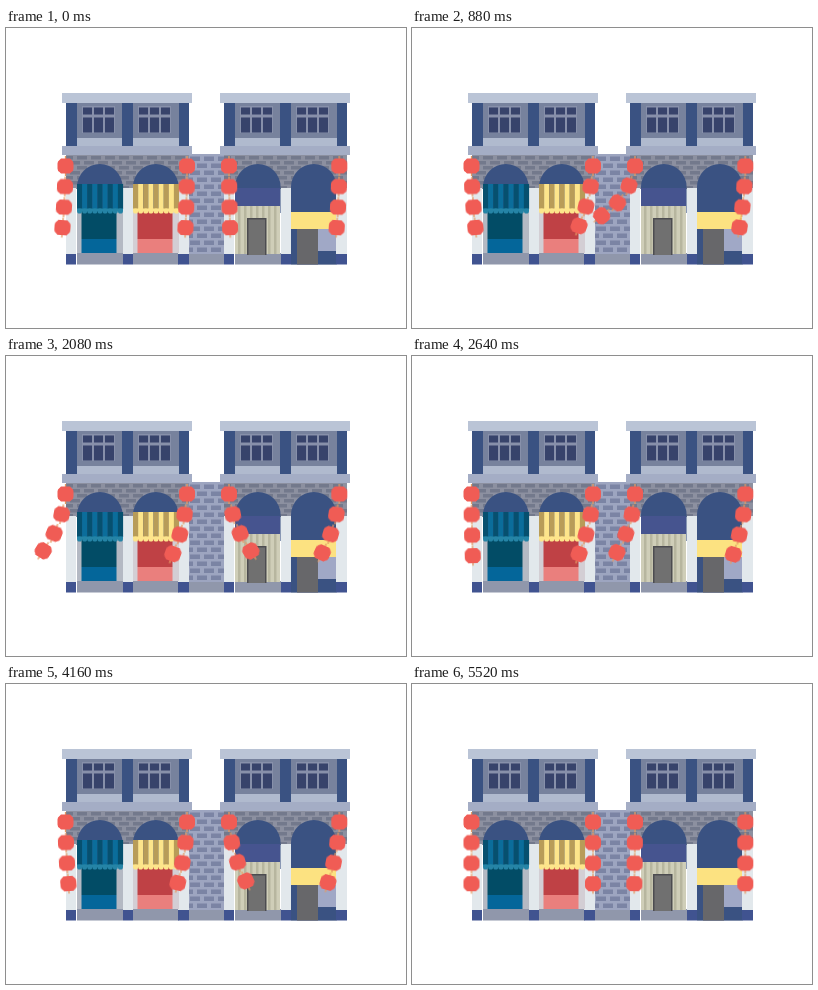
An HTML page for the animation above (5.6 s loop, 400 by 300 pixels).

```html
<!DOCTYPE html>
<html lang="en">
<head>
<meta charset="utf-8">
<title>Shophouses with swinging lanterns</title>
<style>
html, body { margin: 0; width: 100%; height: 100%; overflow: hidden; background: #fff; }
svg { display: block; width: 100vw; height: 100vh; }

/* Each link turns relative to the one above, so the string curls. */
.link { animation: 5600ms cubic-bezier(.37, 0, .63, 1) infinite; transform-origin: 0 0; }
.a .link { animation-name: swing-a; }
.b .link { animation-name: swing-b; }
.c .link { animation-name: swing-c; }
.d .link { animation-name: swing-d; }

@keyframes swing-a {
  0% { transform: rotate(1.4deg); }
  6.79% { transform: rotate(18.5deg); }
  22.86% { transform: rotate(-16deg); }
  36.43% { transform: rotate(10.8deg); }
  54.64% { transform: rotate(-7deg); }
  65.71% { transform: rotate(8.3deg); }
  78.57% { transform: rotate(-4.5deg); }
  88.39% { transform: rotate(1.5deg); }
  91.96%, 100% { transform: rotate(0deg); }
}
@keyframes swing-b {
  0% { transform: rotate(.7deg); }
  9.64% { transform: rotate(15deg); }
  25.71% { transform: rotate(-12deg); }
  41.79% { transform: rotate(11deg); }
  57.86% { transform: rotate(-7deg); }
  70.71% { transform: rotate(7deg); }
  80.71% { transform: rotate(-2.5deg); }
  86.61% { transform: rotate(1deg); }
  91.96%, 100% { transform: rotate(0deg); }
}
@keyframes swing-c {
  0% { transform: rotate(-.5deg); }
  13.57% { transform: rotate(18deg); }
  32.14% { transform: rotate(-14.5deg); }
  51.79% { transform: rotate(12deg); }
  75% { transform: rotate(-8deg); }
  90.18% { transform: rotate(9.5deg); }
  98.57%, 100% { transform: rotate(.3deg); }
}
@keyframes swing-d {
  0% { transform: rotate(1.2deg); }
  9.11% { transform: rotate(14deg); }
  23.93% { transform: rotate(-13.2deg); }
  41.07% { transform: rotate(11deg); }
  57.86% { transform: rotate(-7.6deg); }
  71.07% { transform: rotate(8deg); }
  80.71% { transform: rotate(-2.8deg); }
  86.61% { transform: rotate(1deg); }
  91.96%, 100% { transform: rotate(0deg); }
}
</style>
</head>
<body>
<svg id="stage" viewBox="0 0 400 300">
  <defs>
    <pattern id="brick" width="14" height="10" patternUnits="userSpaceOnUse" y="127">
      <rect width="14" height="10" fill="#8c90a0"/>
      <path d="M1 1h10v3.5h-10zM0 6h4v3.5h-4zM8 6h6v3.5h-6z" fill="#73798c"/>
    </pattern>
    <pattern id="alley" width="14" height="14" patternUnits="userSpaceOnUse" x="183" y="127">
      <rect width="14" height="14" fill="#9da5c0"/>
      <path d="M1 1.5h10v4.5h-10zM0 8.5h4v4.5h-4zM8 8.5h6v4.5h-6z" fill="#7b84a4"/>
    </pattern>
  </defs>
</svg>
<script>
const NS = 'http://www.w3.org/2000/svg';
const stage = document.getElementById('stage');
const BLUE = '#3a5282', BASE = '#405390', ROOF = '#bac4d6', WHITE = '#e2e8ec', STEP = '#9097ab';

function add(parent, tag, attrs) {
  const el = document.createElementNS(NS, tag);
  for (const key in attrs) el.setAttribute(key, attrs[key]);
  return parent.appendChild(el);
}
const box = (g, x, y, width, height, fill) => add(g, 'rect', { x, y, width, height, fill });

function house(dx) {
  const g = add(stage, 'g', { transform: `translate(${dx} 0)` });
  box(g, 60, 75, 123, 43, '#77829d');
  for (const x of [71, 127]) {
    box(g, x, 110, 46, 8, '#b0bace');
    box(g, x + 5, 78, 33, 27, '#8790aa');
    for (const px of [6, 17, 28]) {
      box(g, x + px, 79.5, 9, 7, '#37436b');
      box(g, x + px, 89.5, 9, 15, '#37436b');
    }
  }
  for (const [x, w] of [[60, 11], [116, 11], [173, 10]]) box(g, x, 75, w, 43, BLUE);
  box(g, 56, 65, 130, 10, ROOF);
  box(g, 60, 127, 123, 34, 'url(#brick)');
  box(g, 56, 118, 130, 9, '#a4adc5');
  for (const x of [71, 127]) {
    add(g, 'path', { d: `M${x} 185V159a22.8 23 0 0 1 45.6 0V185z`, fill: BLUE });
    box(g, x, 225, 46, 11.5, STEP);
  }
  for (const [x, w] of [[60, 10], [117, 10], [172, 11]]) {
    box(g, x, 160, w, 66, WHITE);
    box(g, x, 226, w, 10.5, BASE);
  }
}

function awning(x, colors, trim) {
  const w = 46 / 9;
  for (let i = 0; i < 9; i++) {
    const left = x + i * w;
    box(stage, left, 156, w + .1, 25, colors[i % 2]);
    add(stage, 'circle', { cx: left + w / 2, cy: 183, r: w / 2, fill: trim });
  }
  box(stage, x, 180.5, 46, 2.5, trim);
}

function shop(x, frame, dark, front) {
  box(stage, x, 180, 46, 45, frame);
  box(stage, x + 4.5, 180, 35, 31, dark);
  box(stage, x + 4.5, 211, 35, 14, front);
}

function lantern(g) {
  add(g, 'path', { d: 'M0-10V10', stroke: '#e59a63', 'stroke-width': 1.3 });
  add(g, 'path', {
    d: 'M-4.5-7.5H4.5L6-6Q8-5 8-2.5V2.5Q8 5 6 6L4.5 7.5H-4.5L-6 6Q-8 5-8 2.5V-2.5Q-8-5-6-6z',
    fill: '#f05c55'
  });
}

function string(name, x) {
  let g = add(stage, 'g', { class: name, transform: `translate(${x} 138)` });
  lantern(g);
  for (let i = 0; i < 3; i++) {
    const link = add(g, 'g', { class: 'link' });
    g = add(link, 'g', { transform: 'translate(0 20.6)' });
    lantern(g);
  }
}

box(stage, 183, 126, 35, 101, 'url(#alley)');
box(stage, 183, 226, 35, 10.5, STEP);
house(0);
house(158);

shop(71, '#b4b9c3', '#024c66', '#04669a');
awning(71, ['#06506f', '#0b6d9b'], '#2584a6');
shop(127, '#d3ced4', '#bf4145', '#ea7f7d');
awning(127, ['#b89c58', '#fde58b'], '#fde58b');

// Striped shutter shop
box(stage, 229, 160, 45, 18, '#46548f');
box(stage, 229, 178, 45, 48, '#cfceb8');
for (let x = 232; x < 273; x += 6) box(stage, x, 178, 2.5, 48, '#b7b69f');
box(stage, 241, 190, 19.5, 37, '#4c4c50');
box(stage, 242.5, 191.5, 16.5, 35.5, '#707070');

// Corner shop with yellow sign
box(stage, 285, 183, 45, 53.5, BLUE);
box(stage, 312, 201, 18, 22, '#a0a8c6');
box(stage, 291, 201, 21, 35.5, '#67676a');
box(stage, 285, 184, 45, 17, '#fce281');

string('a', 59.5);
string('b', 181);
string('c', 223);
string('d', 333.3);
</script>
</body>
</html>
```
